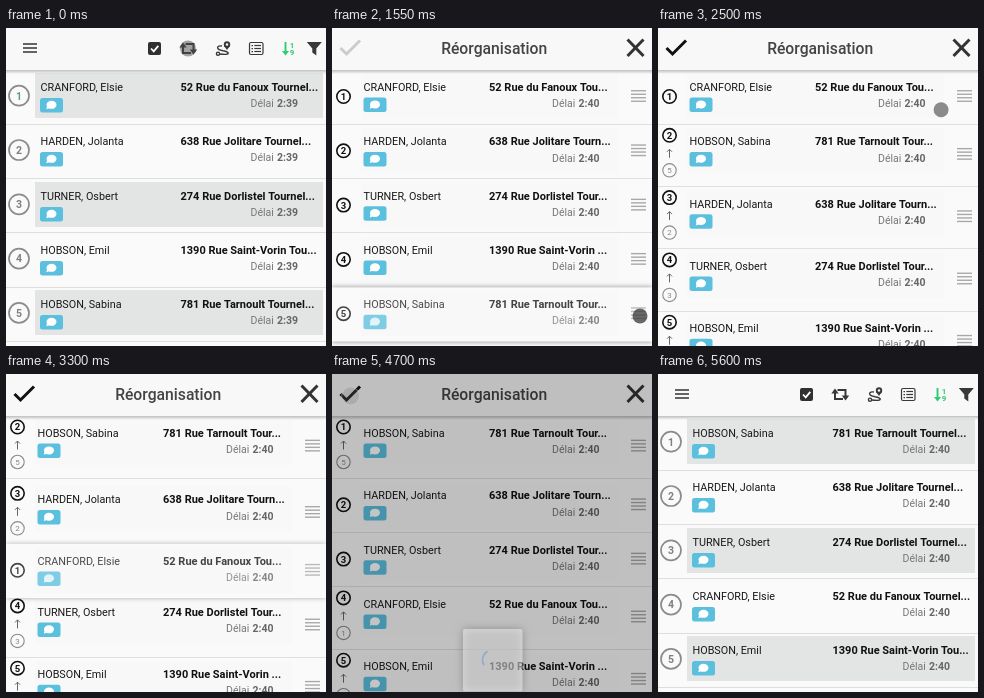
An HTML page with a canvas that plays this animation: 320 px wide and 318 px high, repeating every 6800 ms.

```html
<!DOCTYPE html>
<html lang="fr">
<head>
<meta charset="utf-8">
<title>Réorganisation</title>
<style>
html, body { margin: 0; width: 100%; height: 100%; overflow: hidden; background: #fafafa; }
canvas { display: block; width: 320px; height: 318px; }
</style>
</head>
<body>
<canvas id="stage"></canvas>
<script>
const W = 320, H = 318, LOOP = 6800, STEP = 50;
const TOP = 42, ROW = 54.3, TALL = 62.3;
const FONT = 'Roboto, "Open Sans", sans-serif';
const canvas = document.getElementById('stage');
const c = canvas.getContext('2d');
const dpr = window.devicePixelRatio || 1;
canvas.width = W * dpr;
canvas.height = H * dpr;

// name, street, city part on the main page, city part on the sorting page
const people = [
  ['CRANFORD, Elsie', '52 Rue du Fanoux', 'Tournel...', 'Tou...'],
  ['HARDEN, Jolanta', '638 Rue Jolitare', 'Tournel...', 'Tourn...'],
  ['TURNER, Osbert', '274 Rue Dorlistel', 'Tournel...', 'Tour...'],
  ['HOBSON, Emil', '1390 Rue Saint-Vorin', 'Tou...', '...'],
  ['HOBSON, Sabina', '781 Rue Tarnoult', 'Tournel...', 'Tour...']
];

const span = (t, a, b) => Math.min(1, Math.max(0, (t - a) / (b - a)));
const mix = (a, b, p) => a + (b - a) * p;
const sine = p => (1 - Math.cos(Math.PI * p)) / 2;
const cubicOut = p => 1 - (1 - p) ** 3;

function text(s, x, y, size, color, weight = 400, align = 'left') {
  c.font = `${weight} ${size}px ${FONT}`;
  c.fillStyle = color;
  c.textAlign = align;
  c.fillText(s, x, y);
}

function box(x, y, w, h, color, r = 0) {
  c.fillStyle = color;
  c.beginPath();
  c.roundRect(x, y, w, h, r);
  c.fill();
}

function line(color, width, ...pts) {
  c.strokeStyle = color;
  c.lineWidth = width;
  c.beginPath();
  for (let i = 0; i < pts.length; i += 2) c.lineTo(pts[i], pts[i + 1]);
  c.stroke();
}

function poly(color, ...pts) {
  c.fillStyle = color;
  c.beginPath();
  for (let i = 0; i < pts.length; i += 2) c.lineTo(pts[i], pts[i + 1]);
  c.fill();
}

function disc(x, y, r, color) {
  c.fillStyle = color;
  c.beginPath();
  c.arc(x, y, r, 0, 7);
  c.fill();
}

function ring(x, y, r, color, width) {
  c.strokeStyle = color;
  c.lineWidth = width;
  c.beginPath();
  c.arc(x, y, r, 0, 7);
  c.stroke();
}

function badge(x, y) {
  box(x, y, 23, 14.5, '#5bc0de', 2.5);
  c.fillStyle = '#fff';
  c.beginPath();
  c.ellipse(x + 11.5, y + 6.8, 5, 4, 0, 0, 7);
  c.fill();
  poly('#fff', x + 7.2, y + 7.5, x + 9.8, y + 10, x + 6.3, y + 11.2);
}

function delay(x, y, value) {
  text('Délai', x, y, 10.5, '#777');
  text(value, x + 26.6, y, 10.5, '#666', 700);
}

function header() {
  const g = c.createLinearGradient(0, TOP, 0, TOP + 4);
  g.addColorStop(0, 'rgba(0,0,0,.24)');
  g.addColorStop(1, 'rgba(0,0,0,0)');
  c.fillStyle = g;
  c.fillRect(0, TOP, W, 4);
  box(0, 0, W, TOP, '#f8f8f8');
}

function toolbar() {
  const ink = '#383838', green = '#2fcb71';
  for (const y of [16, 20, 24]) line('#4a4a4a', 1.7, 17, y, 31, y);

  box(142, 14, 13, 13, '#303030', 2);
  line('#fff', 1.8, 145, 20.5, 147.7, 23.3, 152.3, 17.8);

  line(ink, 2, 177, 17, 177, 25, 185, 25);
  poly(ink, 173.3, 19.5, 177, 14.5, 180.7, 19.5);
  line(ink, 2, 179.5, 16, 187.5, 16, 187.5, 24);
  poly(ink, 183.8, 21.5, 187.5, 26.5, 191.2, 21.5);

  disc(221, 16.5, 3.2, ink);
  poly(ink, 218.2, 18, 221, 22, 223.8, 18);
  disc(221, 16.5, 1.2, '#f8f8f8');
  ring(212, 25.7, 1.6, ink, 1.4);
  c.beginPath();
  c.moveTo(213.8, 26);
  c.bezierCurveTo(225, 27.5, 224, 23.5, 217, 22.7);
  c.bezierCurveTo(209, 21.5, 211, 17, 216, 18);
  c.stroke();

  c.strokeStyle = ink;
  c.lineWidth = 1.2;
  c.beginPath();
  c.roundRect(243.5, 14.5, 13.5, 12, 1.5);
  c.stroke();
  for (const y of [17.5, 20.5, 23.5]) {
    box(245.5, y - .6, 1.5, 1.3, ink);
    line(ink, 1.2, 248.3, y, 255, y);
  }

  line(green, 1.9, 279.5, 14, 279.5, 25);
  poly(green, 276, 23, 283, 23, 279.5, 27.5);
  text('1', 286, 20, 8, green, 700, 'center');
  text('9', 286, 27.3, 8, green, 700, 'center');

  poly(ink, 300.8, 14, 315.8, 14, 310.3, 20.5, 310.3, 27.5, 306.3, 24.5, 306.3, 20.5);
}

function mainPage(order, value, active) {
  box(0, 0, W, H, '#fafafa');
  order.forEach((id, i) => {
    const y = TOP + i * ROW, [name, street, city] = people[id];
    if (i % 2 === 0) box(29, Math.round(y + 3), 288, 45, '#e3e4e4');
    ring(13, y + 25.7, 10, '#8b8b8b', 1.7);
    text(i + 1, 13, y + 29.5, 10.5, active && i === 0 ? '#5f9f80' : '#808080', 700, 'center');
    text(name, 34.5, y + 21, 10.8, '#181818');
    text(`${street} ${city}`, 174.5, y + 21, 11, '#111', 700);
    delay(244.5, y + 37, value);
    badge(34, Math.round(y + 28));
    box(0, Math.round(y + ROW - .5), W, 1, '#dedede');
  });
  header();
  toolbar();
}

function sortRow(row) {
  const { id, y, num, from, lifted } = row;
  const h = from ? TALL : ROW, mid = y + (from ? 29.6 : 26);
  const [name, street, , city] = people[id];
  c.save();
  if (lifted) {
    c.shadowColor = 'rgba(0,0,0,.4)';
    c.shadowBlur = 5 * dpr;
    box(0, y, W, h, '#fafafa');
    c.shadowColor = 'transparent';
    c.globalAlpha *= .78;
  } else {
    box(0, Math.round(y + h - .5), W, 1, '#e0e0e0');
  }
  box(29, y + 4, 257, 45, '#f8f8f8');

  const cy = from ? y + 11 : mid + .5;
  ring(11.5, cy, 6.7, '#111', 1.6);
  text(num, 11.5, cy + 3.4, 9.5, '#111', 700, 'center');
  if (from) {
    line('#666', 1, 11.5, y + 33.5, 11.5, y + 25);
    line('#666', 1, 9, y + 27.5, 11.5, y + 25, 14, y + 27.5);
    ring(11.5, y + 46, 6.7, '#8a8a8a', 1.1);
    text(from, 11.5, y + 48.8, 8, '#8a8a8a', 400, 'center');
  }

  text(name, 31.5, y + 21, 10.8, '#181818');
  text(`${street} ${city}`, 157, y + 21, 11, '#111', 700);
  delay(220, y + 37.2, '2:40');
  badge(31.5, y + 27.6);
  for (let k = -1.5; k < 2; k++) line('#a8a8a8', 1.4, 299, mid + k * 3.5, 314, mid + k * 3.5);
  c.restore();
}

// Builds rows from top to bottom; from[i] marks a moved row with its old number.
function stack(order, from) {
  let y = TOP;
  return order.map((id, i) => {
    const row = { id, y, num: i + 1, from: from[i] };
    y += from[i] ? TALL : ROW;
    return row;
  });
}

function sortRows(t) {
  let rows;
  if (t < 2200) {
    rows = stack([0, 1, 2, 3, 4], []);
    rows[4].y = mix(rows[4].y, rows[1].y, sine(span(t, 1600, 2000)));
    for (const i of [1, 2, 3]) {
      const start = 1950 - i * 100;
      rows[i].y += ROW * cubicOut(span(t, start, start + 200));
    }
    rows[4].lifted = t >= 1500 && t < 2150;
  } else if (t < 3750) {
    rows = stack([0, 4, 1, 2, 3], [0, 5, 2, 3, 4]);
    rows[0].y = mix(TOP, TOP + 3 * TALL, sine(span(t, 3000, 3484)));
    [3050, 3184, 3330].forEach((start, i) => {
      rows[i + 1].y -= ROW * cubicOut(span(t, start, start + 200));
    });
    rows[0].lifted = t >= 2950 && t < 3700;
  } else {
    rows = stack([4, 1, 2, 0, 3], [5, 0, 0, 1, 4]);
  }
  return rows.sort((a, b) => !!a.lifted - !!b.lifted);
}

function sortPage(t) {
  box(0, 0, W, H + 40, '#fafafa');
  sortRows(t).forEach(sortRow);
  header();
  line(t < 2200 ? '#cbcbcb' : '#111', 3, 8.5, 20, 14.5, 26, 28, 12.5);
  line('#333', 3, 295.5, 11.5, 311.5, 28);
  line('#333', 3, 311.5, 11.5, 295.5, 28);
  text('Réorganisation', 162.2, 26, 15.7, '#444', 500, 'center');
}

function glide(t, start, x, y) {
  const p = span(t, start, start + 300);
  disc(mix(144, x, p), mix(156, y, p), 7.5, 'rgba(95,95,95,.72)');
}

function cursor(t) {
  if (t < 400) disc(182, 20.5, 8, `rgba(75,75,75,${t < 350 ? .5 : .25})`);
  else if (t >= 1000 && t < 1500) glide(t, 1000, 308, 288);
  else if (t >= 1500 && t < 1650) disc(308, 288, 7.5, 'rgba(55,55,55,.75)');
  else if (t >= 2244 && t < 2950) glide(t, 2244, 307, 69);
  else if (t >= 4100 && t < 4650) glide(t, 4100, 18, 20);
}

function loader(t) {
  const a = span(t, 4600, 4800) * (1 - span(t, 5300, 5450));
  if (!a) return;
  c.save();
  box(0, 0, W, H, `rgba(0,0,0,${.46 * a})`);
  c.globalAlpha = a;
  disc(18.5, 22, 9, 'rgba(110,110,110,.45)');
  ring(18.5, 22, 9, 'rgba(215,215,215,.7)', 1.2);
  c.shadowColor = 'rgba(0,0,0,.5)';
  c.shadowBlur = 8 * dpr;
  box(131, 255, 59.5, 62.5, '#fafafa', 2);
  c.shadowColor = 'transparent';
  const start = -1.6 + (t - 4950) / 750 * Math.PI * 2;
  c.strokeStyle = '#5590dc';
  c.lineWidth = 1.5;
  c.beginPath();
  c.arc(160.5, 286, 10, start, start + 1.6);
  c.stroke();
  c.restore();
}

function draw(t) {
  c.setTransform(dpr, 0, 0, dpr, 0, 0);
  const done = t >= 4650;
  const shown = cubicOut(span(t, 600, 900)) * (1 - span(t, 5350, 5600));
  if (shown < 1) mainPage(done ? [4, 1, 2, 0, 3] : [0, 1, 2, 3, 4], done ? '2:40' : '2:39', !done);
  if (shown > 0) {
    c.save();
    c.globalAlpha = shown;
    c.translate(0, 40 * (1 - shown));
    sortPage(t);
    c.restore();
  }
  cursor(t);
  loader(t);
}

function frame() {
  const t = performance.now() % LOOP;
  draw(Math.floor(t / STEP) * STEP);
  requestAnimationFrame(frame);
}
frame();
</script>
</body>
</html>
```
